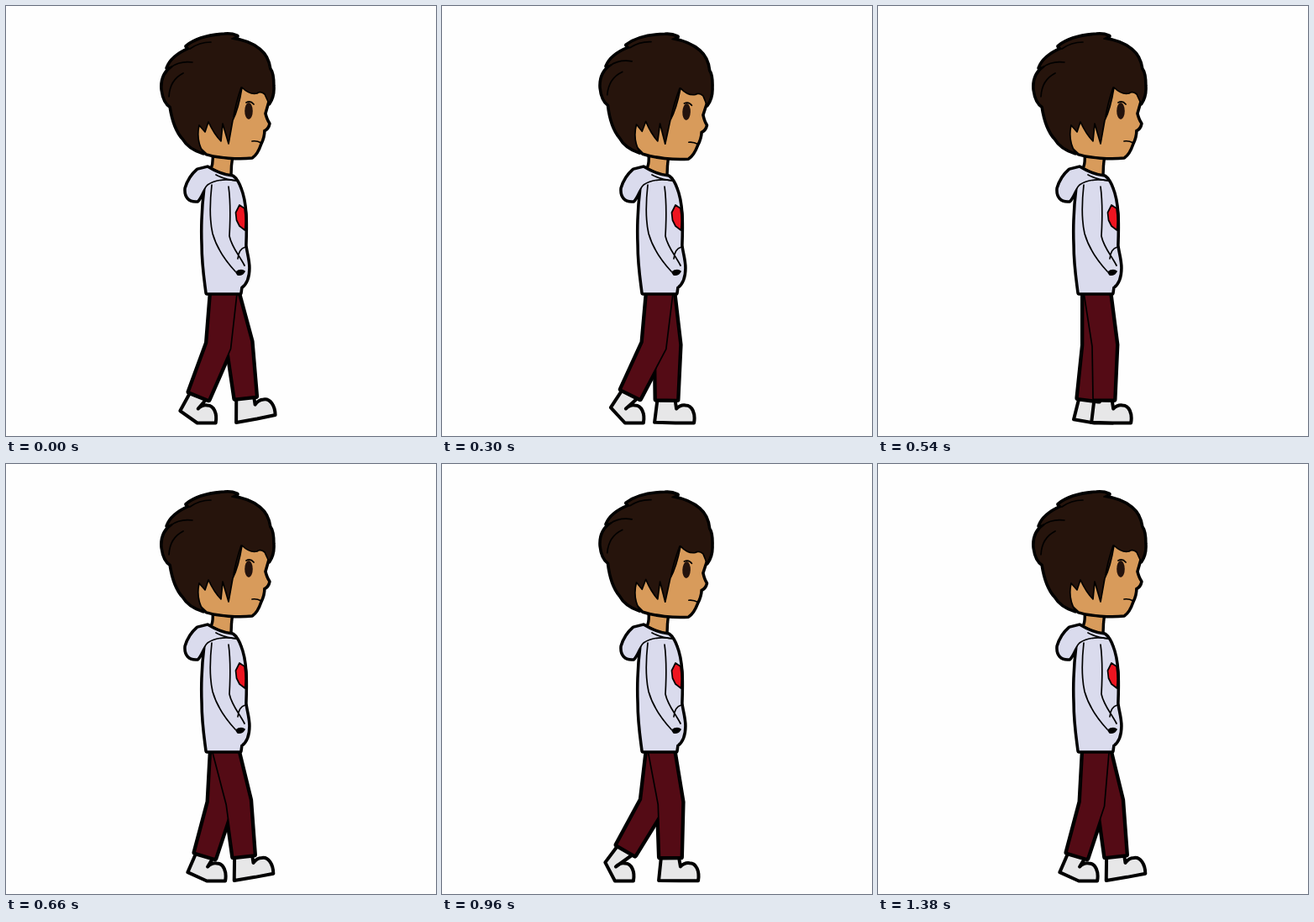
An HTML page that plays this animation: 512 px wide and 512 px high, repeating every 1.44 s.

```html
<!DOCTYPE html>
<html lang="en">
<head>
<meta charset="utf-8">
<title>Walk cycle</title>
<style>
  html, body { margin: 0; width: 100%; height: 100%; overflow: hidden; background: #fefefe; }
  svg { display: block; width: 100vw; height: 100vh; }
  path { stroke: #000; stroke-width: 1.7; stroke-linejoin: round; stroke-linecap: round; }
  .line { fill: none; }
  .rim path { stroke-width: 5.4; }
  .rim .line { display: none; }
  .legs.rim path { stroke-width: 7; }
  .pants { fill: #540b15; }
  .foot { fill: #e7e7e8; stroke-width: 4; }
  .cloth { fill: #dadbed; }
  .skin { fill: #d89b5b; }
  .hair { fill: #26140c; }
</style>
</head>
<body>
<svg viewBox="0 0 512 512">
  <path id="farFoot" class="foot"/>
  <path id="nearFoot" class="foot"/>
  <g class="part legs">
    <path class="pants far"/>
    <path class="pants near"/>
  </g>

  <path class="skin" d="M246 176 Q247 187 244 194 L258 204 L268 202 Q268 190 270 178Z" style="stroke-width:3.4"/>

  <g class="part">
    <path class="cloth" d="M237 215 C234 240 233 262 234 285 C234 308 237 326 239 342
      L279 342 L280 335 C287 330 289 321 289 312 C289 302 286 294 285 285
      C286 258 286 234 279 217 Q276 208 271 204 Q258 203 247 196Z"/>
    <path class="cloth" d="M240 192 L228 195 C221 201 216 210 214 217 C213 227 218 233 228 232
      C233 227 234 219 240 213 C250 206 262 206 274 208 Q273 205 270 203 Q254 201 240 192Z"/>
    <path class="line" d="M245 213 Q241 249 246 271 C251 289 262 304 273 316
      M265 215 C268 237 267 256 266 274 C269 288 278 297 284 309
      M276 301 Q277 289 285 287 M250 201 Q261 207 276 208"/>
    <path d="M284 241 L278 237 L273.5 246 L274.5 255 L278 262 L284.5 267 Q286 254 284 241Z" fill="#ee1420"/>
    <path d="M274 317 Q279 313 284 316 Q281 321 276 320Z"/>
  </g>

  <g id="head">
    <g class="part">
      <path class="skin" d="M311 98 L312 114 L308 128 Q310 136 313 140 Q312 146 307 148 Q307 156 303 164
        Q299 176 293 180 C277 182 252 180 239 176 L226 164 L230 90Z"/>
      <path class="hair" d="M235 175 Q218 170 211 158 Q200 146 196 120 Q188 115 186 100
        Q184 82 198 72 L192 74 Q197 60 218 51 L215 48 Q230 36 260 34 Q268 33 275 36 L269 39
        Q290 42 302 52 Q312 60 314 75 Q318 80 318 95 Q319 107 313 116
        L308 105 Q303 101 299 104 Q290 106 281 97 Q277 122 270 136 L265 164 L258 140 L256 161
        Q248 153 241 138 L237 150 L230 142 Q226 160 235 175Z"/>
      <path class="line" d="M196 73 Q207 65 222 67 M194 108 Q195 88 211 80 M219 51 Q230 43 244 43
        M271 132 Q273 118 280 97 M286 115 Q291 112 295 117 M293 161 Q298 160 304 163"/>
    </g>
    <ellipse cx="289" cy="125" rx="4.8" ry="10" fill="#24130d"/>
  </g>
</svg>
<script>
const LOOP = 1440, STEP = 60, TURN = 2 * Math.PI;
const GROUND = 496.5, HIP = { x: 260, y: 343 };
const { sin, cos, sqrt, min, max, PI } = Math;
const rad = deg => deg * PI / 180;
const clamp = v => min(1, max(0, v));

// Each part gets a thick copy behind it, so only its silhouette is bold.
for (const part of document.querySelectorAll(".part")) {
  const rim = part.cloneNode(true);
  rim.classList.add("rim");
  part.before(rim);
}

// A swing of one slow and one fast wave, in degrees
const wave = (a, mid, c1, s1, c2, s2) =>
  mid + c1 * cos(a) + s1 * sin(a) + c2 * cos(2 * a) + s2 * sin(2 * a);
const thighAt = a => wave(a, 3.1, -11.4, -4.5, 2.3, -0.8);
const shinAt = a => wave(a, -9.5, -14.2, -9.3, 1.8, -5.2);

const along = (p, deg, len) => ({ x: p.x + sin(rad(deg)) * len, y: p.y + cos(rad(deg)) * len });
const across = (p, deg, len) => along(p, deg + 90, len);
const turn = (p, deg, x, y) => {
  const c = cos(rad(deg)), s = sin(rad(deg));
  return { x: p.x + x * c - y * s, y: p.y + x * s + y * c };
};
const xy = p => p.x.toFixed(2) + " " + p.y.toFixed(2);

function legPath(knee, bend, ankle, shin) {
  return "M" + [
    { x: 244.5, y: 338 }, across(knee, bend, -14.5), across(ankle, shin, -12.5),
    across(ankle, shin, 12.5), across(knee, bend, 14.5), { x: 275.5, y: 338 }
  ].map(xy).join("L") + "Z";
}

// The ball stays on the ground while the heel lifts; a leading foot lands heel first.
function footPath(ankle, shin) {
  const pitch = min(0, -1.8 * shin);
  const heel = turn(ankle, -shin, -14, 25);
  heel.y += (GROUND - 0.5 - heel.y) * clamp(1 + shin / 10);
  const rise = GROUND - heel.y;
  const ball = { x: heel.x + sqrt(max(100, 625 - rise * rise)), y: GROUND + 25 * sin(rad(pitch)) };
  const toe = turn(ball, pitch, 22, 0);
  const at = (x, y) => xy(turn(toe, pitch, x, y));
  return `M${xy(across(ankle, shin, -11))} L${xy(heel)} L${xy(ball)} L${xy(toe)} ` +
    `C${at(2, -11)} ${at(-2, -21)} ${at(-10, -21)} Q${at(-16, -22)} ${at(-21, -17)} ` +
    `L${xy(across(ankle, shin, 10))}Z`;
}

function drawLeg(name, a) {
  const thigh = thighAt(a), shin = shinAt(a);
  const knee = along(HIP, thigh, 62);
  const ankle = along(knee, shin, 64);
  const leg = legPath(knee, (thigh + shin) / 2, ankle, shin);
  for (const el of document.querySelectorAll(".pants." + name)) el.setAttribute("d", leg);
  document.getElementById(name + "Foot").setAttribute("d", footPath(ankle, shin));
}

function draw(now) {
  const a = Math.floor((now % LOOP) / STEP) * STEP / LOOP * TURN;
  drawLeg("near", a);
  drawLeg("far", a + PI);
  // The head nods once per stride.
  const nod = 2 * clamp(2 * cos(2 * a - 0.75 * PI) - 0.5);
  document.getElementById("head").setAttribute("transform", `rotate(${nod.toFixed(3)} 258 185)`);
}

const start = performance.now();
function tick() {
  draw(performance.now() - start);
  requestAnimationFrame(tick);
}
tick();
</script>
</body>
</html>
```
